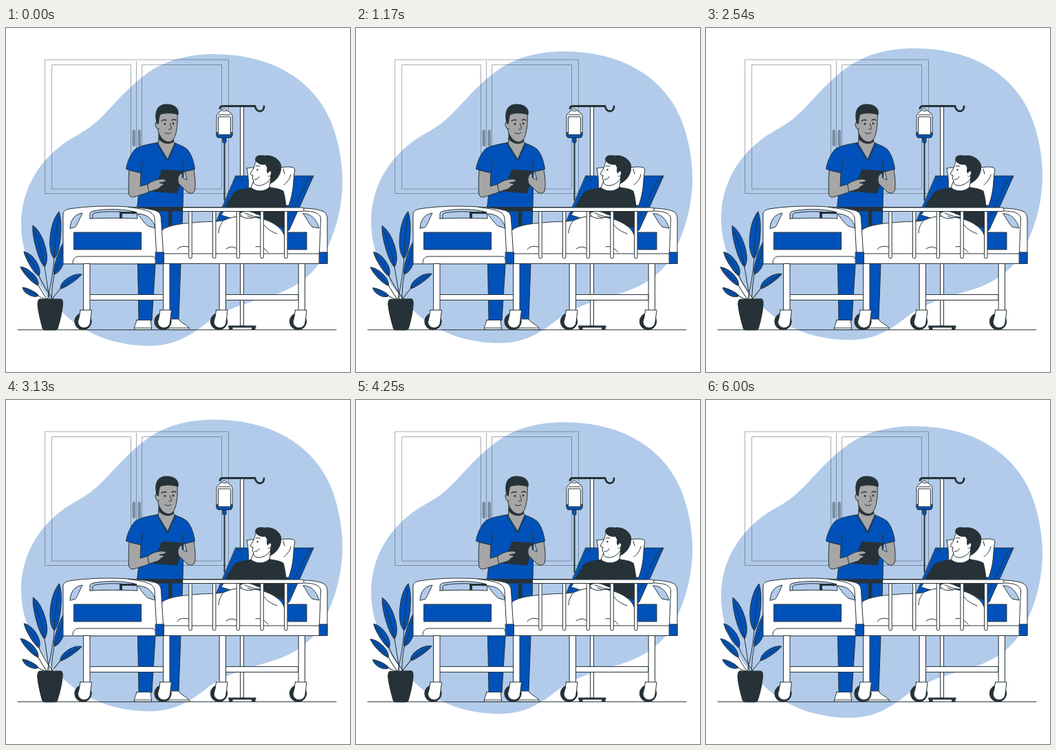
Recreate the animation shown at these times as an HTML page. Size 500 by 500 pixels, loop 6040 ms.

```html
<!DOCTYPE html>
<html lang="en">
<head>
<meta charset="utf-8">
<title>Hospital ward</title>
<style>
  html, body { margin: 0; width: 100%; height: 100%; overflow: hidden; background: #fff; }
  svg { display: block; width: 100%; height: 100%; stroke: #263238; stroke-width: 1; stroke-linejoin: round; stroke-linecap: round; fill: #fff; }
  .blue { fill: #0052ba; }
  .dark { fill: #263238; }
  .skin { fill: #a6a6a6; }
  .sky { fill: #b2cbea; }
  .line { fill: none; }
  .bare { stroke: none; }
</style>
</head>
<body>
<svg viewBox="0 0 500 500">
  <path id="blob" class="sky bare" d="M302 38C394 38 449 82 471 133C483 161 489 194 489 223C489 262 478 305 455 342C437 368 412 382 378 391.500C345 401 317 410 295 426C269 447 245 462 208 462C165 462 120 448 88 419C47 383 22 335 22 285C22 235 48 195 80 171C100 156 114 152 132 136C156 114 172 90 205 66C232 46 268 38 302 38Z"/>

  <!-- cabinet -->
  <g class="line" opacity=".4">
    <path d="M57 46H323.500V240.500H57ZM67 53.500H181.500V234H67ZM198 53.500H313.500V234H198ZM189.500 48V240.500"/>
    <rect class="dark bare" x="183.500" y="148" width="4.600" height="24" rx="2"/>
    <rect class="dark bare" x="191.500" y="148" width="4.600" height="24" rx="2"/>
  </g>

  <path class="line" d="M17 438.700H480"/>

  <g id="plant">
    <g id="leaves"></g>
    <path class="dark" d="M49 394H80Q83 395 82.500 402C81 418 78 427 75 437Q74 439 71 439H57Q54 439 53 436C50 425 47 414 46 402Q46 395 49 394Z"/>
  </g>

  <!-- drip stand -->
  <path d="M341 113H345.500V433H341Z"/>
  <path class="dark" d="M324 433H363V435H324ZM325 435h4v3.500h-4ZM358 435h4v3.500h-4Z"/>
  <path class="line" stroke-width="2.800" d="M311 117Q311 113.500 316 113.500H362C363 118 365 121 369 121C373 121 375 118 375 114"/>
  <path class="line" stroke-width="2" d="M317.500 165V250"/>
  <path d="M317.500 117L327 124Q329 126 329 129V155Q329 159.500 325 159.500H310Q306 159.500 306 155V129Q306 126 308 124Z"/>
  <path class="blue" d="M306 152H329V155.500Q328 159.500 325 159.500H310Q306 159.500 306 155.500Z"/>
  <rect x="308.500" y="129" width="18" height="26" rx="1"/>
  <path class="line" d="M309 126H326M315 120.500H320"/>
  <path class="blue" d="M315 159.500H320V166Q317.500 169 315 166Z"/>

  <!-- nurse -->
  <path class="blue" d="M190 260L193 425H212L217 345V300H230L237 424H251L257 260Z"/>
  <path d="M190 424.500H210.500C210 430 212 434 211.500 438.500H186.500C186 433 189 430 190 424.500Z"/>
  <path d="M237 423H251C253 429 265 431 267 438.500H236C235 433 238 429 237 423Z"/>
  <path class="line" d="M187 436H211M237 436H266"/>
  <path class="skin" d="M222 148V169L211 176L235 206L259 175L243.500 168V150Z"/>
  <path class="dark bare" d="M222 152L243 162V165C237 169 228 166 222 158Z"/>
  <path class="skin" d="M219.500 126C219 136 220 149 223 155C227 163 234 167 239 165.500C248 162 250 140 249 122H222Z"/>
  <path class="skin" d="M221 138C217 135 216 139 218 144Q220 148 222.500 146"/>
  <path class="dark" d="M219 138C216 124 218 112 232 111C245 110.500 252 117 250 126C243 123 231 123 224 125.500C222 130 222 135 221.500 139Z"/>
  <path class="line" d="M226 135Q229.500 132.500 233 134M241 134Q244 132 247 134" stroke-width="1.500"/>
  <path class="line" d="M238.500 139C239 143 241 145 240.500 146.500Q239 148 236.500 147M231 152Q235 155.500 240 152"/>
  <circle class="dark bare" cx="231" cy="139.500" r="1.400"/>
  <circle class="dark bare" cx="243" cy="139" r="1.400"/>

  <path class="blue" d="M221 166.500C208 169 193 171 187 177C180 185 176 196 174.500 205Q185 209 196 211L190.500 262H257L258 209Q267 208 274.500 205C273 194 269 182 263 176C257 171 249 169 244 166.500L235 190Z"/>
  <path class="skin" d="M222 165L221 168L235 191L245 168L243.500 163Q234 170 222 160Z"/>
  <path class="dark bare" d="M222.500 157C229 166 238 169 243 163L243 166C235 171 227 167 222.500 162Z"/>
  <path class="line" d="M196 211L199 194M258 209L256 194M218 167L235 194L247 168"/>
  <path class="skin" d="M179 207C178 218 178 230 178.500 241Q180 248 188 245L222 234L224 224L213 225L195 230L196 211Z"/>
  <path class="dark" d="M227 206L257 208L249 240L215 237.500Z"/>
  <path class="skin" d="M206 227C214 221 223 219 230 220Q234 221.500 231 223.500L223 225L228 226Q231 228 226 229.500L221 234L208 238Z"/>
  <path class="skin" d="M273 206C275 218 276 230 274 237Q270 243 263 238L251 226Q248 218 253 212Q257 210 256 217L263 221L260 209Z"/>

  <!-- far rail -->
  <path class="dark" d="M188 260.500H330V266H188ZM237 266H241V290H237Z"/>

  <!-- headboard -->
  <path d="M404 342V262H432C444 262 456 264 462 267Q467 270 467 278V342Z"/>
  <path class="line" d="M433 266C447 266 457 269 457.500 277L455.500 326"/>
  <path class="sky" d="M432 270C443 269 452 279 455 291L445 289C440 284 437 277 432 270Z"/>
  <rect class="blue" x="408" y="297" width="29" height="25"/>

  <!-- backrest and pillow -->
  <path class="blue" d="M334 215H447L412 293L404 300L303 288Z"/>
  <path class="line" d="M447 215L438 222L405 290M334 215L343 222"/>
  <path d="M350 204C360 201 370 205 382 204C397 204 409 200 418 203Q421 205 419 211C417 224 419 235 411 258L360 256C347 248 356 228 350 204Z"/>
  <path class="line" d="M404 228C409 224 413 219 414 213M403 205L405 212"/>

  <!-- patient -->
  <path d="M318 264L334 259L350 270L332 278L313 272Z"/>
  <path class="dark" d="M357 232C345 234 335 235 331 240L319 259L346 270L373 274L385 284L406 291C409 272 407 250 403 237C397 233 388 233 381 231Z"/>
  <path d="M360 222L356 232C364 239 377 238 383 231L386 212Z"/>
  <path d="M364 192C361 199 361 203 358 207L355 212Q355 214 359 214L358 219L360 222C359 227 363 229 369 229C376 228 382 224 386 216L388 198Z"/>
  <path class="dark" d="M363 193C361 186 368 184 376 186C386 184 397 190 399.500 199C401 210 395 221 384 226C385 220 385 216 384 213C379 212 379 207 380 203L377 198C372 199 367 198 363 193Z"/>
  <path d="M380.500 211C382 207 386 207 385.500 211C385 215 382 217 380.500 215" stroke-width=".8"/>
  <path class="line" d="M361 220Q366 221 368 216M363 201Q366 199 369 201"/>
  <circle class="dark bare" cx="365.500" cy="206" r="1.200"/>

  <!-- blanket and frame -->
  <path d="M226 294C238 285 260 284 282 282C297 281 309 282 318 279C335 271 355 273 371 277C387 281 403 291 405 304V329H226Z"/>
  <path class="line" d="M249 322C252 317 259 316 268 319M371 278C374 289 383 295 394 299M320 321C327 316 334 318 339 324M363 318C369 316 376 320 381 326M316 280C311 286 309 292 309 298"/>
  <path d="M340 269C349 264 357 267 363 270L371 273Q370 276 363 274L358 276Q349 278 343 274Z"/>
  <path class="line" d="M347 269L361 274M351 273L359 276"/>
  <path d="M229 328H456V342.500H229Z"/>

  <!-- near rail -->
  <g id="posts"></g>
  <path d="M257 261H431Q433 261 433 264Q433 266.500 431 266.500H257Z"/>

  <!-- footboard -->
  <path d="M83 342.500V271C83 266 87 264 92 263C115 259 150 258 178 260C196 261 208 263 216 265C223 267 225 271 225.500 277L228.500 326V342.500Z"/>
  <path class="line" d="M178 260.500C200 263 215 266 216 277L218.500 326M97 342C97 336 100 332 106 332H212Q217 332 217 336"/>
  <path class="sky" d="M93 291C94 279 99 271 111 269C107 277 104 285 101 289Z"/>
  <path class="sky" d="M122 277V270Q122 267 127 266C148 262 170 263 187 267Q191 268 191 277C168 276 145 276 122 277Z"/>
  <path class="dark bare" d="M165 267H190V270H169V276.500H165Z"/>
  <path class="line" d="M126 276.500V271Q127 269 131 268.500C150 266 168 266 186 270"/>
  <path class="sky" d="M191 270C206 270 214 279 217 291L207 288C201 284 197 277 191 270Z"/>
  <rect class="blue" x="99" y="297" width="97.500" height="25"/>
  <rect class="blue" x="217.500" y="326" width="12" height="16.500"/>
  <rect class="blue" x="455.500" y="326" width="11.500" height="16.500"/>

  <g id="legs"></g>
</svg>
<script>
  const $ = id => document.getElementById(id);

  // base x, y, tip x, y, half width, bend
  const leaves = [
    [70, 335, 77, 267, 10, -2],
    [56, 347, 39, 287, 9, 3],
    [70, 358, 86, 308, 8, 3],
    [48, 360, 26, 325, 7, 3],
    [47, 374, 21, 347, 6, 2],
    [47, 389, 24, 377, 5, -2],
    [79, 379, 110, 358, 6, -3]
  ];

  function leaf([x, y, tx, ty, w, bend], i) {
    const dx = tx - x, dy = ty - y, len = Math.hypot(dx, dy);
    const at = (k, side) => {
      const off = side * w + bend;
      return `${x + dx * k - dy / len * off} ${y + dy * k + dx / len * off}`;
    };
    const root = 60 + i % 4 * 3;
    return `<path class="blue" d="M${x} ${y}C${at(.15, 1)} ${at(.75, 1)} ${tx} ${ty}C${at(.75, -1)} ${at(.15, -1)} ${x} ${y}Z"/>
      <path class="line" d="M${root} 395Q${x - dx * .2} ${y - dy * .35} ${x} ${y}Q${at(.45, 0)} ${x + dx * .88} ${y + dy * .88}"/>`;
  }
  $('leaves').innerHTML = leaves.map(leaf).join('');

  $('posts').innerHTML = [0, 1, 2, 3, 4].map(i =>
    `<rect x="${265.8 + i * 34.7}" y="265" width="4.400" height="69.500" rx="1"/>`).join('');

  const leg = x => `
    <circle class="dark" cx="${x}" cy="426.500" r="12.200"/>
    <path d="M${x + 1} 342.500H${x + 10}V411H${x + 1}Z"/>
    <path d="M${x - 4} 410H${x + 12.5}L${x + 10.5} 427A9 9 0 0 1 ${x - 7.5} 427Q${x - 5} 420 ${x - 4} 410Z"/>`;
  const bar = (x, w) => `<rect x="${x}" y="387.500" width="${w}" height="8"/>`;
  $('legs').innerHTML = bar(115, 114) + bar(312, 113) + [112, 228, 309.5, 424.5].map(leg).join('');

  const LOOP = 6040, FLOAT = 6000, SWAY = 1500;

  function sway(t) {
    const p = t % SWAY / SWAY;
    return p < .25 ? 4 * p : p < .75 ? 2 - 4 * p : 4 * p - 4;
  }

  function draw(now) {
    const t = Math.min(now % LOOP, FLOAT);
    const rise = 10 * (1 - Math.abs(2 * t / FLOAT - 1));
    $('blob').setAttribute('transform', `translate(0 ${-rise})`);
    $('plant').setAttribute('transform', `rotate(${sway(t)} 65.5 353)`);
    requestAnimationFrame(draw);
  }
  draw(0);
</script>
</body>
</html>
```
